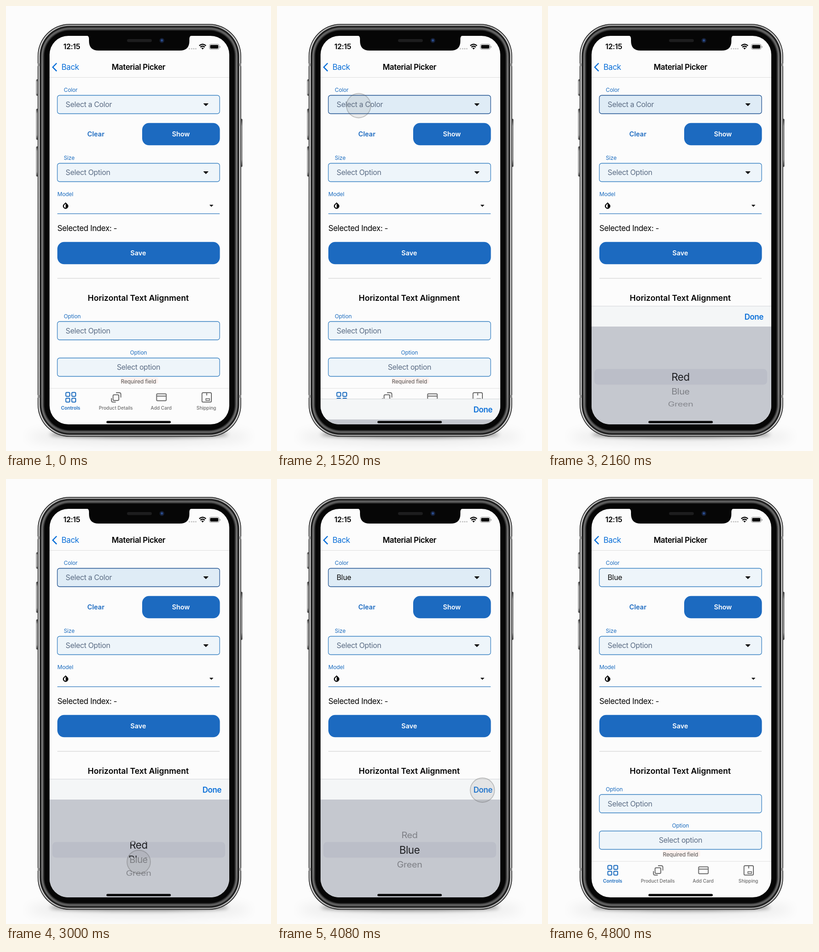
Recreate the animation shown at these times as an HTML page. Size 578 by 969 pixels, loop 5000 ms.

```html
<!DOCTYPE html>
<html lang="en">
<head>
<meta charset="utf-8">
<title>Material Picker</title>
<style>
  html, body { margin: 0; width: 100%; height: 100%; overflow: hidden; background: #fcfcfc; }
  svg { display: block; width: 578px; height: 969px; }
  text { font-family: Inter, Roboto, sans-serif; letter-spacing: -0.022em; }
  .label { font-size: 12px; fill: #1b6cbf; letter-spacing: -0.01em; }
  .value { font-size: 16px; fill: #5b6c84; }
  .value.set { fill: #0b0b0b; }
  .button { font-size: 14.5px; font-weight: 600; letter-spacing: 0; }
  .heading { font-size: 17.6px; font-weight: 600; letter-spacing: 0; }
  .title { font-size: 17px; font-weight: 600; }
  .plain { font-size: 17px; }
  .blue { font-size: 17px; fill: #0a6fd8; }
  .done { font-size: 17px; font-weight: 600; fill: #0a6fd8; }
  .tab { font-size: 10.2px; font-weight: 500; letter-spacing: 0; fill: #6c6c6c; }
  .tab.on { fill: #1b6cbf; }
  .wheel { font-size: 20px; fill: #7b7d83; }
  .lens { font-size: 22.5px; fill: #1d1e21; }
  .field { fill: #eef5fa; stroke: #3a82c2; stroke-width: 1.3; }
  .field.active { fill: #dfecf6; stroke: #1f5190; }
  .icon { fill: none; stroke: #6c6c6c; stroke-width: 2; }
  .icon.on { stroke: #1b6cbf; }
</style>
</head>
<body>
<svg id="stage" viewBox="0 0 578 969" xmlns="http://www.w3.org/2000/svg"></svg>
<script>
const LOOP = 5000, STEP = 40;
const PANEL_TOP = 653, PANEL_HEIGHT = 258;
const OPTIONS = ['Red', 'Blue', 'Green'];
const stage = document.getElementById('stage');

const text = (s, x, y, cls, anchor = 'start', extra = '') =>
  `<text x="${x}" y="${y}" class="${cls}" text-anchor="${anchor}" ${extra}>${s}</text>`;
const rect = (x, y, w, h, r, attrs) =>
  `<rect x="${x}" y="${y}" width="${w}" height="${h}" rx="${r}" ${attrs}/>`;
const path = (d, attrs) => `<path d="${d}" ${attrs}/>`;
const line = (x1, x2, y, color, width = 1) =>
  path(`M${x1} ${y}H${x2}`, `stroke="${color}" stroke-width="${width}"`);
const field = (y, id = '') => rect(112, y, 354, 40, 5, `class="field" ${id}`);
const arrow = (x, y, w) =>
  path(`M${x - w} ${y - w / 2}h${2 * w}l${-w} ${w}z`,
    'fill="#080808" stroke="#080808" stroke-linejoin="round"');
const button = (x, y, w) => rect(x, y, w, 48.5, 15, 'fill="#1c6ac0"');

function phoneBody() {
  const rings = [
    [0, '#202020'], [1.6, 'url(#silver)'], [4.6, '#161616'],
    [7, '#3c3c3c'], [8.5, 'url(#steel)'], [11, '#565656'], [12.5, '#2c2c2c'], [14.5, '#060606']
  ];
  const keys = [[66, 160, 35], [66, 224, 67], [66, 306, 65], [510.5, 246, 104]];
  return `
    <ellipse cx="290" cy="938" rx="245" ry="17" fill="#000" opacity=".07" filter="url(#wide)"/>
    <ellipse cx="290" cy="933" rx="195" ry="7" fill="#000" opacity=".5" filter="url(#near)"/>` +
    keys.map(([x, y, h]) => rect(x, y, 5, h, 1.5, 'fill="url(#key)" stroke="#555" stroke-width=".7"')).join('') +
    rings.map(([d, fill]) =>
      rect(69 + d, 39 + d, 444 - 2 * d, 899 - 2 * d, 70 - d, `fill="${fill}"`)).join('') +
    [125, 847].map(y => rect(69, y, 5, 6, 0, 'fill="#8c8c8c"') +
      rect(508, y, 5, 6, 0, 'fill="#8c8c8c"')).join('');
}

function statusBar() {
  const dots = [400, 405, 409.5, 414]
    .map(x => `<circle cx="${x}" cy="93" r="1.5" fill="#bcbcbc"/>`).join('');
  const wifi = path('M421.5 86.5q7.3-6.5 14.6 0M424 89.6q4.8-4.2 9.6 0',
    'fill="none" stroke="#080808" stroke-width="2.4"') +
    path('M426 91.8q2.8-2.2 5.6 0l-2.8 2.9z', 'fill="#080808"');
  const battery = rect(443.5, 83, 21.5, 11.5, 3.5, 'fill="none" stroke="#8d8d8d"') +
    rect(445.2, 84.7, 18, 8.1, 2, 'fill="#080808"') + rect(466, 87, 1.5, 4, .7, 'fill="#999"');
  return text('12:15', 125, 94, 'title', 'start', 'style="font-size:16px"') + dots + wifi + battery;
}

function form() {
  return path('M110.5 124.5l-8.5 8.7 8.5 8.7', 'fill="none" stroke="#0a6fd8" stroke-width="2.5"') +
    text('Back', 121, 139, 'blue') +
    text('Material Picker', 289, 139, 'title', 'middle') +
    line(95, 487, 155.5, '#dedede') +

    text('Color', 126, 187, 'label') + field(194.5, 'id="colorField"') +
    text('', 130, 220, 'value', 'start', 'id="colorValue"') + arrow(436, 215, 5) +
    text('Clear', 196, 284, 'button', 'middle', 'fill="#1c6ac0"') +
    button(297, 254.8, 169.5) + text('Show', 381.5, 284, 'button', 'middle', 'fill="#fff"') +

    text('Size', 126, 335, 'label') + field(342.5) +
    text('Select Option', 130, 368, 'value') + arrow(436, 363, 5) +

    text('Model', 112, 414, 'label') +
    path('M130 428l4 4a5.5 5.5 0 1 1-8 0z', 'fill="#080808" stroke="#080808" stroke-linejoin="round"') +
    path('M130 430l-2.7 3.2a3.8 3.8 0 0 0 2.7 6.3z', 'fill="#fff"') +
    arrow(448, 435, 3.5) + line(112, 466, 452.3, '#2f78bd', 1.3) +

    text('Selected Index: -', 112, 489.5, 'plain') +
    button(112, 513.8, 354.5) + text('Save', 288.5, 543, 'button', 'middle', 'fill="#fff"') +
    line(112, 466, 593, '#cbcbcb') +
    text('Horizontal Text Alignment', 288.5, 642, 'heading', 'middle') +

    text('Option', 126, 680, 'label') + field(687) + text('Select Option', 130, 713, 'value') +
    text('Option', 289, 759, 'label', 'middle') + field(766.5) +
    text('Select option', 289, 792, 'value', 'middle') +
    rect(250, 809, 82, 13, 3, 'fill="#fdeeea" opacity=".7"') +
    text('Required field', 289, 822, 'label', 'middle', 'style="fill:#555"');
}

function tabs() {
  const squares = [[130.5, 841.5], [143.5, 841.5], [130.5, 854], [143.5, 854]]
    .map(([x, y]) => rect(x, y, 8.5, 8.5, 2, 'class="icon on"')).join('');
  const copies = rect(233.5, 846.5, 12.5, 12.5, 2.5, 'class="icon"') +
    path('M240 842h7q3.5 0 3.5 3.5v7M230 854v5q0 3.5 3.5 3.5h6', 'class="icon"');
  const card = rect(328.5, 844.5, 21, 15, 2, 'class="icon"') + path('M328 849.5h22', 'class="icon"');
  const box = rect(427.5, 842, 20.5, 20.5, 2.5, 'class="icon"') +
    path('M437.8 842v6', 'class="icon"') + rect(436, 855, 8, 4, 0, 'class="icon" style="stroke-width:1.6"');
  return line(95, 487, 832.5, '#e1e1e1') + squares + copies + card + box +
    text('Controls', 141, 878.5, 'tab on', 'middle', 'style="font-weight:600"') +
    text('Product Details', 239.5, 878.5, 'tab', 'middle') +
    text('Add Card', 338.5, 878.5, 'tab', 'middle') +
    text('Shipping', 437, 878.5, 'tab', 'middle');
}

// Panel coordinates start at its top left corner.
function panel() {
  const rows = cls => OPTIONS.map(name => text(name, 0, 0, cls, 'middle')).join('');
  return `<g id="panel">` +
    rect(95, 0, 392, 260, 0, 'fill="#c5c8cf"') +
    rect(95, 0, 392, 45, 0, 'fill="#f4f6f7"') + line(95, 487, .5, '#d4d6d9') +
    text('Done', 470, 29.5, 'done', 'end', 'id="done"') +
    rect(101, 137.5, 377, 34, 8, 'fill="#bbbec8"') +
    `<g clip-path="url(#outside)">${rows('wheel')}</g>
     <g clip-path="url(#inside)">${rows('lens')}</g></g>`;
}

function notch() {
  return path('M175 64q6 1 6 7v5q0 21 21 21h177q21 0 21-21v-5q0-6 6-7z', 'fill="#060606"') +
    rect(264, 72, 54, 6.5, 3.2, 'fill="#1d1d1e"') +
    '<circle cx="340" cy="75" r="5.2" fill="#162038"/><circle cx="340" cy="75" r="2.4" fill="#2b4f92"/>';
}

stage.innerHTML = `
  <defs>
    <linearGradient id="silver">
      <stop offset="0" stop-color="#d2d2d2"/><stop offset=".12" stop-color="#a2a2a2"/>
      <stop offset=".88" stop-color="#a2a2a2"/><stop offset="1" stop-color="#d2d2d2"/>
    </linearGradient>
    <linearGradient id="steel" x2="0" y2="1">
      <stop offset="0" stop-color="#606060"/><stop offset=".1" stop-color="#7c7c7c"/>
      <stop offset=".9" stop-color="#7c7c7c"/><stop offset="1" stop-color="#606060"/>
    </linearGradient>
    <linearGradient id="key" x2="0" y2="1">
      <stop offset="0" stop-color="#444"/><stop offset=".15" stop-color="#b5b5b5"/>
      <stop offset=".85" stop-color="#b5b5b5"/><stop offset="1" stop-color="#444"/>
    </linearGradient>
    <filter id="wide" x="-20%" y="-150%" width="140%" height="400%"><feGaussianBlur stdDeviation="13"/></filter>
    <filter id="near" x="-20%" y="-150%" width="140%" height="400%"><feGaussianBlur stdDeviation="4"/></filter>
    <clipPath id="screen"><rect x="95" y="65" width="392" height="846" rx="41"/></clipPath>
    <clipPath id="inside"><rect x="101" y="137.5" width="377" height="34"/></clipPath>
    <clipPath id="outside"><path d="M95 45h392v92.5h-392zM95 171.5h392v90h-392z"/></clipPath>
  </defs>
  ${phoneBody()}
  <g clip-path="url(#screen)">
    ${rect(95, 65, 392, 846, 0, 'fill="#fcfcfc"')}
    ${statusBar()}${form()}${tabs()}${panel()}
    ${rect(219, 903.5, 140.5, 5, 2.5, 'id="home" fill="#050505"')}
  </g>
  ${notch()}
  <circle id="touch" fill="#777" fill-opacity=".14" stroke="#555" stroke-opacity=".32" stroke-width="1.8"/>`;

const [panelEl, doneEl, homeEl, touchEl, fieldEl, valueEl] =
  ['panel', 'done', 'home', 'touch', 'colorField', 'colorValue'].map(id => document.getElementById(id));
const wheelRows = stage.querySelectorAll('.wheel');
const lensRows = stage.querySelectorAll('.lens');

const touches = [
  { x: 178, y: 217, r: 26.5, from: 1320, to: 1640 },
  { x: 289.5, y: 845, r: 25.5, from: 2840, to: 3240, drag: true },
  { x: 448, y: 677.5, r: 26.5, from: 4000, to: 4300 }
];

const clamp = v => Math.min(1, Math.max(0, v));
const ramp = (t, a, b) => clamp((t - a) / (b - a));
const smooth = p => p * p * (3 - 2 * p);
// Critically damped spring from 0 to 1.
function spring(t, start, rate) {
  const x = Math.max(0, t - start) * rate;
  return 1 - (1 + x) * Math.exp(-x);
}

function panelShown(t) {
  if (t < 1840) return spring(t, 1475, .0193);
  return t < 4560 ? 1 - spring(t, 4263, .0193) : 0;
}

function drawTouch(t, scroll) {
  const touch = touches.find(c => t >= c.from && t < c.to);
  if (!touch) return touchEl.setAttribute('opacity', 0);
  const enter = ramp(t, touch.from - 40, touch.from + 80);
  const leave = ramp(t, touch.to - 100, touch.to);
  touchEl.setAttribute('opacity', enter * (1 - leave));
  touchEl.setAttribute('cx', touch.x);
  touchEl.setAttribute('cy', touch.y - (touch.drag ? 32 * scroll : 0));
  touchEl.setAttribute('r', touch.r * (1.3 - .3 * enter));
}

function drawPicker(scroll) {
  OPTIONS.forEach((_, i) => {
    const angle = (i - scroll) * 23 * Math.PI / 180;
    const y = 154.8 + 82 * Math.sin(angle), squash = Math.cos(angle);
    wheelRows[i].setAttribute('transform', `translate(289 ${y + 7.2 * squash}) scale(1 ${squash})`);
    wheelRows[i].setAttribute('opacity', .6 + .4 * squash);
    lensRows[i].setAttribute('transform', `translate(289 ${162.8 + 32 * (i - scroll)})`);
  });
}

function render(t) {
  const scroll = smooth(ramp(t, 2840, 3240));
  panelEl.setAttribute('transform', `translate(0 ${PANEL_TOP + PANEL_HEIGHT * (1 - panelShown(t))})`);
  doneEl.setAttribute('opacity', 1 - .5 * ramp(t, 4060, 4240));
  homeEl.setAttribute('opacity', t >= 4320 && t < 4440 ? .7 : 1);
  fieldEl.classList.toggle('active', t >= 1460 && t < 4260);
  const chosen = t >= 3480;
  valueEl.textContent = chosen ? 'Blue' : 'Select a Color';
  valueEl.classList.toggle('set', chosen);
  drawPicker(scroll);
  drawTouch(t, scroll);
}

const start = performance.now();
function tick() {
  const t = (performance.now() - start) % LOOP;
  render(Math.floor(t / STEP) * STEP);
  requestAnimationFrame(tick);
}
tick();
</script>
</body>
</html>
```
